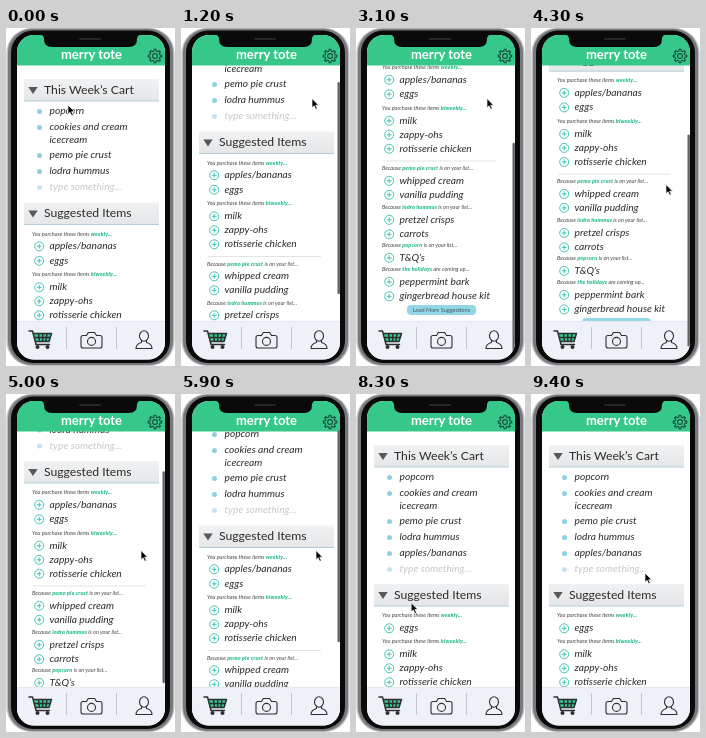
These frames come from a looping animation (169 px wide and 338 px high, 9500 ms). An HTML page:

```html
<!DOCTYPE html>
<html lang="en">
<head>
<meta charset="utf-8">
<title>Shopping list</title>
<style>
  html, body { margin: 0; width: 100%; height: 100%; overflow: hidden; background: #fff; }
  svg { display: block; width: 169px; height: 338px; }
  text { font-family: Lato, "Open Sans", sans-serif; fill: #2b2b2b; white-space: pre; }
  .title { font-size: 13px; font-weight: 700; fill: #fff; text-anchor: middle; }
  .head { font-size: 12.2px; }
  .item { font-size: 10.2px; font-style: italic; }
  .hint { fill: #c3c8cb; }
  .note { font-size: 5.5px; font-style: italic; fill: #444; }
  .note tspan { font-weight: 900; fill: #2fc08b; letter-spacing: .12px; }
  .load { font-size: 5.6px; fill: #3d5660; text-anchor: middle; }
  .plus { fill: none; stroke: #35bfae; stroke-width: .9; }
  .icon { fill: none; stroke: #2b2f33; stroke-width: 1.1; stroke-linejoin: round; stroke-linecap: round; }
</style>
</head>
<body>
<svg viewBox="0 0 169 338">
  <defs>
    <clipPath id="screen"><rect x="11" y="7" width="148" height="324.5" rx="17"/></clipPath>
    <clipPath id="view"><rect x="11" y="37" width="148" height="256"/></clipPath>
    <linearGradient id="bar" x2="0" y2="1">
      <stop stop-color="#f0f1f2"/><stop offset="1" stop-color="#e4e6e8"/>
    </linearGradient>
  </defs>

  <rect x=".5" y="0" width="168" height="338" rx="25" fill="#b9bcc0"/>
  <rect x="2" y=".8" width="165" height="336.2" rx="24" fill="#77797c"/>
  <rect x="5" y="2.5" width="159" height="332.5" rx="22" fill="#0a0a0b"/>

  <g clip-path="url(#screen)">
    <rect x="11" y="7" width="148" height="325" fill="#fff"/>
    <g id="list" clip-path="url(#view)"></g>

    <rect x="11" y="7" width="148" height="30.5" fill="#36c88b"/>
    <text class="title" x="85.5" y="30.6">merry tote</text>
    <g id="gear" class="icon" transform="translate(149 28)" style="stroke:#174b3a"></g>

    <rect x="11" y="293" width="148" height="39" fill="#eef1f7"/>
    <path d="M11 293.3H159" stroke="#d9dde4" stroke-width=".6"/>
    <path d="M60.5 299V321M110.5 299V321" stroke="#b4bac3" stroke-width=".8"/>
    <path d="M27.5 305.5H45.5L43 313.5H29.5Z" fill="#36c88b"/>
    <path class="icon" style="stroke-width:1.5" d="M23 303H26.5L30 316.5H43.5M27.2 305.5H45.5L43 313.5H29.3M28 309.5H44.3M32.5 305.5L33.5 313.5M36.7 305.5V313.5M41 305.5L39.8 313.5"/>
    <circle cx="31.5" cy="319" r="2" fill="#2b2f33"/>
    <circle cx="41.5" cy="319" r="2" fill="#2b2f33"/>
    <path class="icon" d="M77 307.5H80.5L82.3 304.5H88.7L90.5 307.5H94Q96 307.5 96 309.5V318Q96 320 94 320H77Q75 320 75 318V309.5Q75 307.5 77 307.5Z"/>
    <circle class="icon" cx="85.5" cy="313.4" r="4"/>
    <ellipse class="icon" cx="138" cy="308" rx="4.5" ry="5.2"/>
    <path class="icon" d="M135.5 312.5V314.5Q130 316 130 320.5H146Q146 316 140.5 314.5V312.5"/>
    <rect id="thumb" x="156.5" width="2.4" height="212" rx="1.2" fill="#606366"/>
  </g>

  <path d="M33 6Q38 7 38 11Q38 19 46 19H123Q131 19 131 11Q131 7 136 6Z" fill="#0a0a0b"/>
  <rect x="73" y="10" width="22" height="2" rx="1" fill="#25272a"/>

  <path id="cursor" d="M0 0V9.2L2.1 7.3L3.7 10.8L5.3 10.1L3.7 6.7H6.6Z" fill="#000" stroke="#fff" stroke-width=".7"/>
</svg>

<script>
const LOOP = 9500, STEP = 100, ADD_AT = 7800;
const $ = id => document.getElementById(id);
const list = $('list');
const rows = [];

function el(tag, attrs, parent, text) {
  const node = document.createElementNS('http://www.w3.org/2000/svg', tag);
  for (const k in attrs) node.setAttribute(k, attrs[k]);
  if (text) node.textContent = text;
  return parent.appendChild(node);
}

// shift: vertical move once the tapped item joins the cart
function row(y, shift = 0, show = 'always') {
  const g = el('g', {}, list);
  rows.push({ g, y, shift, show });
  return g;
}

function heading(y, label, shift) {
  const g = row(y, shift);
  el('rect', { x: 18, y: -10.5, width: 135, height: 22, fill: 'url(#bar)' }, g);
  el('path', { d: 'M18 11.5H153', stroke: '#b3ced6', 'stroke-width': 1 }, g);
  el('path', { d: 'M22.3 -2.5H31.7L27 4.5Z', fill: '#55595c' }, g);
  el('text', { class: 'head', x: 38, y: 4.2 }, g, label);
}

function bullet(y, label, shift, show, hint) {
  const g = row(y, shift, show);
  el('circle', { cx: 33.5, cy: .5, r: 2.5, fill: hint ? '#c4e5ed' : '#91cfe0' }, g);
  el('text', { class: hint ? 'item hint' : 'item', x: 43.5, y: 3.3 }, g, label);
}

function option(y, label, shift, show) {
  const g = row(y, shift, show);
  el('circle', { class: 'plus', cx: 33.2, cy: .3, r: 4.5 }, g);
  el('path', { class: 'plus', d: 'M30.8 .3H35.6M33.2 -2.1V2.7' }, g);
  el('text', { class: 'item', x: 43.5, y: 3.3 }, g, label);
}

function note(y, before, key, after, shift = 1) {
  const t = el('text', { class: 'note', x: 26, y: 1.8 }, row(y, shift), before);
  el('tspan', {}, t, key);
  t.append(after);
}

heading(61.5, 'This Week’s Cart');
bullet(83, 'popcorn');
bullet(99, 'cookies and cream');
el('text', { class: 'item', x: 43.5, y: 3.3 }, row(112), 'icecream');
bullet(127, 'pemo pie crust');
bullet(143, 'lodra hummus');
bullet(159, 'apples/bananas', 0, 'after');
bullet(159, 'type something...', 16, 'always', true);

heading(185, 'Suggested Items', 15.5);
note(206, 'You purchase these items ', 'weekly...', '', 15.5);
option(218, 'apples/bananas', 0, 'before');
option(232.5, 'eggs', 1.5);
note(246.5, 'You purchase these items ', 'biweekly...', '');
[[259, 'milk'], [273, 'zappy-ohs'], [287, 'rotisserie chicken'],
 [319, 'whipped cream'], [333, 'vanilla pudding'],
 [358, 'pretzel crisps'], [372.5, 'carrots'], [396, 'T&Q’s'],
 [420, 'peppermint bark'], [434.5, 'gingerbread house kit']
].forEach(([y, label]) => option(y, label, 1));

el('path', { d: 'M27 0H140', stroke: '#d5d9dc', 'stroke-width': .7 }, row(299.5, 1));
note(307, 'Because ', 'pemo pie crust', ' is on your list...');
note(346, 'Because ', 'lodra hummus', ' is on your list...');
note(384, 'Because ', 'popcorn', ' is on your list...');
note(408, 'Because ', 'the holidays', ' are coming up...');

const load = row(448.5, 1);
el('rect', { x: 51, y: -5, width: 69, height: 10, rx: 4, fill: '#93d7e6' }, load);
el('text', { class: 'load', x: 85.5, y: 2 }, load, 'Load More Suggestions');

const teeth = [...Array(8)].map((_, i) => {
  const p = (r, d) => {
    const a = (i + d) * Math.PI / 4;
    return `${(r * Math.cos(a)).toFixed(2)} ${(r * Math.sin(a)).toFixed(2)}`;
  };
  return [p(5, -.3), p(6.8, -.18), p(6.8, .18), p(5, .3)].join('L');
});
el('path', { d: `M${teeth.join('L')}Z` }, $('gear'));
el('circle', { r: 2.4 }, $('gear'));

// Tables of [time, ...values]
const scrollKeys = [[600, 0], [1200, 71], [2100, 135], [2800, 166.5], [4100, 166.5], [5000, 107.5], [6500, 0]];
const pointerKeys = [[200, 62, 77], [900, 131, 70.5], [3300, 131, 70.5], [4000, 135, 156.5],
  [6300, 135, 156.5], [7200, 39, 217], [8000, 39, 217], [9000, 114, 179]];
const thumbKeys = [[600, 0], [800, 1], [3500, 1], [3800, 0], [4000, 0], [4200, 1], [6700, 1], [7000, 0]];

const linear = p => p;
const smooth = p => p * p * (3 - 2 * p);

function sample(keys, t, ease = linear) {
  const i = keys.findIndex(k => k[0] > t);
  if (i === 0) return keys[0].slice(1);
  if (i < 0) return keys[keys.length - 1].slice(1);
  const a = keys[i - 1], b = keys[i];
  const p = ease((t - a[0]) / (b[0] - a[0]));
  return a.slice(1).map((v, j) => v + (b[j + 1] - v) * p);
}

function draw(t) {
  const added = t >= ADD_AT;
  const [scroll] = sample(scrollKeys, t);
  const [x, y] = sample(pointerKeys, t, smooth);
  for (const r of rows) {
    const top = r.y + (added ? r.shift : 0) - scroll;
    r.g.setAttribute('transform', `translate(0 ${top})`);
    const hidden = r.show !== 'always' && (r.show === 'after') !== added;
    r.g.setAttribute('visibility', hidden ? 'hidden' : 'visible');
  }
  $('thumb').setAttribute('y', 9 + scroll * .635);
  $('thumb').setAttribute('opacity', sample(thumbKeys, t)[0]);
  $('cursor').setAttribute('transform', `translate(${x} ${y})`);
}

const start = performance.now();
function tick() {
  const t = (performance.now() - start) % LOOP;
  draw(Math.floor(t / STEP) * STEP);
  requestAnimationFrame(tick);
}
tick();
</script>
</body>
</html>
```
